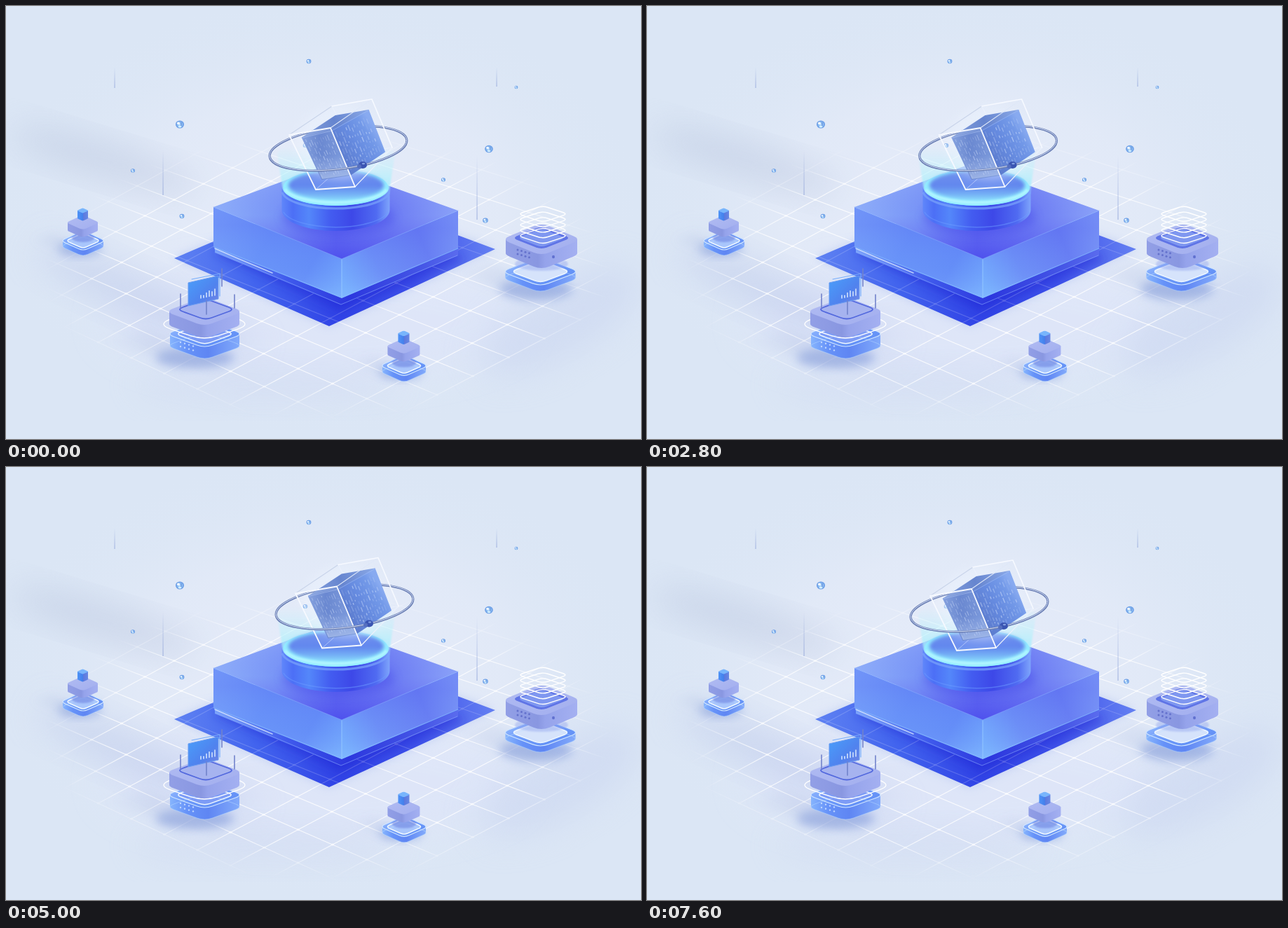
An HTML page for the animation above (7.8 s loop, 906 by 618 pixels).

```html
<!DOCTYPE html>
<html lang="en">
<head>
<meta charset="utf-8">
<title>Isometric platform</title>
<style>
html, body { margin: 0; width: 100%; height: 100%; overflow: hidden; background: #dbe6f5; }
svg { display: block; width: 100vw; height: 100vh; }
</style>
</head>
<body>
<svg id="stage" viewBox="0 0 906 618" xmlns="http://www.w3.org/2000/svg"></svg>
<script>
const stage = document.getElementById('stage');
const STEP = 200, LOOP = 7800;

// --- drawing helpers -------------------------------------------------
const stops = list => list.map(([at, color, alpha = 1]) =>
  `<stop offset="${at}" stop-color="${color}" stop-opacity="${alpha}"/>`).join('');
const linear = (id, x1, y1, x2, y2, list) =>
  `<linearGradient id="${id}" gradientUnits="userSpaceOnUse" x1="${x1}" y1="${y1}" x2="${x2}" y2="${y2}">${stops(list)}</linearGradient>`;
const boxed = (id, x2, y2, list) =>
  `<linearGradient id="${id}" x1="0" y1="0" x2="${x2}" y2="${y2}">${stops(list)}</linearGradient>`;
const radial = (id, list) => `<radialGradient id="${id}">${stops(list)}</radialGradient>`;
const blur = (id, size) =>
  `<filter id="${id}" x="-50%" y="-50%" width="200%" height="200%"><feGaussianBlur stdDeviation="${size}"/></filter>`;
const poly = (points, fill, more = '') => `<polygon points="${points}" fill="${fill}" ${more}/>`;
const line = (points, color, width = 1, more = '') =>
  `<polyline points="${points}" fill="none" stroke="${color}" stroke-width="${width}" stroke-linejoin="round" stroke-linecap="round" ${more}/>`;
const ellipse = (cx, cy, rx, ry, fill, more = '') =>
  `<ellipse cx="${cx}" cy="${cy}" rx="${rx}" ry="${ry}" fill="${fill}" ${more}/>`;
const round = (color, width) => `stroke="${color}" stroke-width="${width}" stroke-linejoin="round"`;

// Rounded rhombus whose visible extents are hw and hh.
function rhomb(cx, cy, hw, hh, fill, more = '', cut = 0.2) {
  const w = hw / (1 - cut / 2), h = hh / (1 - cut / 2);
  const corners = [[cx - w, cy], [cx, cy - h], [cx + w, cy], [cx, cy + h]];
  const toward = (a, b) => [a[0] + (b[0] - a[0]) * cut, a[1] + (b[1] - a[1]) * cut];
  const d = corners.map((c, i) => {
    const before = toward(c, corners[(i + 3) % 4]), after = toward(c, corners[(i + 1) % 4]);
    return `${i ? 'L' : 'M'}${before}Q${c} ${after}`;
  }).join('');
  return `<path d="${d}Z" fill="${fill}" ${more}/>`;
}

function box(cx, cy, hw, hh, h, top, side) {
  return rhomb(cx, cy + h, hw, hh, side) +
    `<rect x="${cx - hw}" y="${cy}" width="${2 * hw}" height="${h}" fill="${side}"/>` +
    rhomb(cx, cy, hw, hh, top);
}

function random(seed) {
  return () => (seed = (seed * 16807) % 2147483647) / 2147483647;
}

// --- scenery -----------------------------------------------------------
const SHEET = '240,360 461,457 698,347 470,262';
const TOP = '296,287 460,226 645,292 479,361';
const LEFT = '296,287 479,361 479,417 296,344';
const RIGHT = '479,361 645,292 645,346 479,417';

const defs = `<defs>
${radial('haze', [[0, '#e6ecfa'], [0.55, '#e3eaf8', 0.8], [1, '#dbe6f5', 0]])}
${radial('fade', [[0, '#fff'], [0.75, '#fff', 0.9], [1, '#fff', 0]])}
${radial('drop', [[0, '#d3ecff'], [0.5, '#93c3f5'], [1, '#5f93e2']])}
${linear('streak', 0, 0, 0, 1, [[0, '#8ea2d8', 0], [1, '#8ea2d8', 0.8]])}
${boxed('cast', 1, 0.45, [[0, '#a9b8de', 0], [1, '#a9b8de', 0.6]])}
${linear('sheet', 240, 361, 698, 347, [[0, '#5f82f2'], [0.25, '#4264ee'], [0.5, '#3144e6'], [0.75, '#3f52ea'], [1, '#6480f2']])}
${linear('top', 300, 285, 645, 295, [[0, '#92b5fa'], [0.25, '#7a99f7'], [0.5, '#5c66f0'], [0.72, '#6b7bf3'], [1, '#8ea8f9']])}
${linear('topShade', 470, 235, 470, 361, [[0, '#a5bcfb', 0.4], [0.5, '#6a72f2', 0.1], [1, '#4644ec', 0.65]])}
${linear('left', 296, 300, 479, 400, [[0, '#82b2fc'], [0.4, '#6c9af9'], [0.75, '#6692f8'], [1, '#74acfd']])}
${linear('right', 479, 390, 645, 318, [[0, '#78b4fe'], [0.3, '#7094f7'], [0.7, '#6c83f3'], [1, '#86a5f8']])}
${boxed('faceShade', 0, 1, [[0.2, '#4f5cf0', 0.35], [0.65, '#5a74f4', 0.15], [1, '#8fc0ff', 0.3]])}
${linear('plate', 298, 350, 645, 350, [[0, '#7aa2fa'], [0.3, '#3f5aec'], [0.55, '#2c37de'], [0.85, '#4556e6'], [1, '#5a6bee']])}
${linear('drum', 394, 0, 547, 0, [[0, '#5f86fa'], [0.1, '#4c6ff6'], [0.25, '#5487fa'], [0.45, '#435cf0'], [0.65, '#3d48e8'], [0.88, '#506bf1'], [1, '#7da3fb']])}
${linear('disc', 0, 236, 0, 282, [[0, '#6f92ee'], [0.45, '#6286ee'], [0.7, '#73aef5'], [1, '#93ecff']])}
${linear('beam', 0, 200, 0, 286, [[0, '#b9f1fb', 0], [0.4, '#b4f1fb', 0.5], [0.75, '#a0effd', 0.9], [1, '#86e9ff']])}
${linear('faceL', 423, 215, 480, 212, [[0, '#7d9bdc'], [0.45, '#5f7fcd'], [1, '#7090d8']])}
${linear('faceR', 478, 215, 530, 180, [[0, '#5d7dcf'], [0.45, '#668be0'], [0.8, '#7399e8'], [1, '#88aaf0']])}
${linear('faceT', 423, 188, 517, 149, [[0, '#87a3de'], [0.5, '#6685cf'], [1, '#8aa8e6']])}
${linear('faceFade', 0, 212, 0, 248, [[0, '#b9cdf2', 0], [1, '#b9cdf2', 0.6]])}
${linear('hoop', 376, 0, 572, 0, [[0, '#6b7fb4'], [0.35, '#9db0dc'], [0.65, '#6478b8'], [1, '#7788bd']])}
${boxed('glass', 1, 1, [[0, '#9cc1ff'], [0.5, '#6d9af9'], [1, '#5c8af4']])}
${boxed('glassSide', 1, 0, [[0, '#86b4fd'], [0.25, '#6692f8'], [0.55, '#5f86f3'], [1, '#82aafb']])}
${boxed('lilacTop', 1, 1, [[0, '#b0bbf2'], [1, '#a3afef']])}
${boxed('lilacSide', 1, 0, [[0, '#929fe6'], [0.45, '#8997e1'], [0.55, '#95a3eb'], [1, '#a4b0f1']])}
${boxed('cell', 1, 0, [[0, '#4f93f6'], [0.5, '#4480ec'], [0.52, '#5a78de'], [1, '#6787e4']])}
${boxed('panel', 1, 1, [[0, '#49a0fb'], [0.6, '#5082ee'], [1, '#7684e2']])}
${blur('soft', 1.2)}${blur('glow', 2.5)}${blur('mist', 7)}${blur('fog', 24)}
<mask id="gridMask">${ellipse(458, 385, 405, 205, 'url(#fade)')}</mask>
<clipPath id="onSheet">${poly(SHEET, '#000')}</clipPath>
</defs>`;

function background() {
  return `<rect width="906" height="618" fill="#dbe6f5"/>` +
    ellipse(450, 300, 470, 320, 'url(#haze)') +
    ellipse(440, 450, 300, 85, '#dde4f9', 'opacity=".6" filter="url(#fog)"') +
    ellipse(140, 220, 140, 24, '#b4c0da', 'opacity=".45" filter="url(#fog)" transform="rotate(17 140 220)"') +
    ellipse(200, 420, 170, 30, '#bcc8ea', 'opacity=".5" filter="url(#fog)" transform="rotate(25 200 420)"') +
    ellipse(790, 450, 130, 50, '#c8d3f0', 'opacity=".5" filter="url(#fog)" transform="rotate(-30 790 450)"') +
    ellipse(370, 540, 190, 26, '#cbd5f0', 'opacity=".4" filter="url(#fog)"');
}

function grid() {
  const front = [465, 492], left = [165, 366], right = [706, 364], back = [378, 250];
  const at = (i, j) => [0, 1].map(k => {
    const u = i / 6, v = j / 5;
    return +((1 - u) * ((1 - v) * front[k] + v * right[k]) + u * ((1 - v) * left[k] + v * back[k])).toFixed(1);
  });
  let out = '';
  for (let i = -3; i <= 9; i++) out += line(`${at(i, -3)} ${at(i, 9)}`, '#fff', 1.1);
  for (let j = -3; j <= 9; j++) out += line(`${at(-3, j)} ${at(9, j)}`, '#fff', 1.1);
  for (let i = -3; i <= 9; i++) for (let j = -3; j <= 9; j++) {
    const [x, y] = at(i, j);
    out += ellipse(x, y, 2, 1.4, '#fff');
  }
  return `<g id="grid" mask="url(#gridMask)" opacity=".9">${out}</g>`;
}

function streaks() {
  return [[155, 87, 30], [224, 205, 65], [700, 87, 28], [672, 213, 92]].map(([x, y, h]) =>
    `<rect width="1.1" height="1" fill="url(#streak)" transform="translate(${x - 0.5} ${y}) scale(1 ${h})"/>`).join('');
}

function drops() {
  return [[432, 79, 3.4], [248, 169, 6], [181, 235, 3], [251, 300, 3.4], [728, 116, 2.4],
    [689, 204, 5.8], [624, 248, 3], [684, 306, 3.8], [427, 199, 3.3]].map(([x, y, r]) =>
    ellipse(x, y, r, r * 0.92, 'url(#drop)') +
    ellipse(x - r * 0.35, y - r * 0.3, r * 0.32, r * 0.28, '#fff', 'opacity=".9"') +
    ellipse(x + r * 0.3, y - r * 0.1, r * 0.2, r * 0.45, '#4274cc', 'opacity=".45"') +
    ellipse(x, y + r * 0.55, r * 0.4, r * 0.2, '#d6f3ff')).join('');
}

function platform() {
  return poly(SHEET, '#8fa5ea', 'opacity=".35" filter="url(#mist)"') +
    poly(SHEET, 'url(#sheet)') +
    '<g clip-path="url(#onSheet)">' +
    poly('296,352 479,436 655,360 470,285', '#1f24d0', 'opacity=".45" filter="url(#mist)"') +
    '<use href="#grid" opacity=".22"/></g>' +
    poly('298,345 478,415 645,347 645,356 478,427 298,352', 'url(#plate)') +
    line('298,346 330,360 380,381', '#dcebff', 1.6, 'opacity=".75"') +
    line('300,351 478,426 644,356', '#8fb0ff', 1, 'opacity=".55"') +
    poly(LEFT, 'url(#left)') + poly(LEFT, 'url(#faceShade)') +
    poly(RIGHT, 'url(#right)') + poly(RIGHT, 'url(#faceShade)') +
    poly(TOP, 'url(#top)') + poly(TOP, 'url(#topShade)') +
    line('296,287 479,361 645,292', '#8db2ff', 1, 'opacity=".6"') +
    line('479,362 479,416', '#9accff', 1.2, 'opacity=".7"') +
    line('297,344 479,416 645,346', '#87bcff', 1.2, 'opacity=".7"');
}

function drum() {
  return ellipse(474, 301, 80, 25, '#3d3ee6', 'opacity=".35" filter="url(#mist)"') +
    `<path d="M387 212L395 262A76 27 0 0 0 547 262L555 212A84 20 0 0 0 387 212Z" fill="url(#beam)" filter="url(#soft)"/>` +
    `<path d="M393.500 257V291A77 30 0 0 0 547.500 291V257A77 28 0 0 1 393.500 257Z" fill="url(#drum)"/>` +
    `<path d="M394 266A77 26 0 0 0 547 266" fill="none" stroke="#7ba4fc" stroke-width="3" opacity=".7"/>` +
    `<path d="M396 294A76 27 0 0 0 545 294" fill="none" stroke="#6d9bff" stroke-width="1.500" opacity=".5"/>` +
    ellipse(470.500, 259, 75, 26, '#93ecff') +
    ellipse(471, 256, 68, 21, 'url(#disc)', 'filter="url(#glow)"') +
    `<path d="M398 262A74 23 0 0 0 543 262" fill="none" stroke="#b8f8ff" stroke-width="4" opacity=".8" filter="url(#soft)"/>`;
}

// --- satellites ----------------------------------------------------------
const shadow = (x, y, rx, ry) =>
  ellipse(x - rx * 0.15, y, rx, ry, '#7f99dc', 'opacity=".6" filter="url(#mist)"') +
  poly(`${x + rx * 0.5},${y + ry * 0.7} ${x - rx * 0.6},${y + ry * 0.7} ${x - rx * 2.4},${y - rx * 0.45} ${x - rx * 1.4},${y - rx * 0.75}`,
    'url(#cast)', 'opacity=".7" filter="url(#mist)"');

function slab(cx, cy, hw, hh, h, hollow) {
  return box(cx, cy, hw, hh, h, 'url(#glass)', 'url(#glassSide)') +
    rhomb(cx, cy, hw, hh, 'none', 'stroke="#cfe5ff" stroke-width="1.200"') +
    rhomb(cx, cy, hw * 0.76, hh * 0.76, hollow, 'stroke="#eef7ff" stroke-width="1.500"') +
    rhomb(cx, cy + h, hw, hh, 'none', 'stroke="#bfe0ff" stroke-width="1" opacity=".45"');
}

function smallNode(cx, cy, scale) {
  return shadow(cx, cy + 46, 31, 9) + `<g transform="translate(${cx} ${cy}) scale(${scale})">` +
    slab(0, 34, 29, 13, 8, '#a9c6fc') +
    ellipse(0, 30, 16, 6, '#6377dc', 'opacity=".5" filter="url(#soft)"') +
    box(-0.5, 8, 21.5, 9.5, 11, 'url(#lilacTop)', 'url(#lilacSide)') +
    box(-0.5, -9, 7.5, 3.5, 11, '#78b5fc', 'url(#cell)') + '</g>';
}

function stackNode() {
  let out = shadow(764, 404, 52, 15) + slab(762.5, 379, 50, 19, 9, '#d6e3fb') +
    ellipse(764, 368, 38, 10, '#8b9eed', 'opacity=".4" filter="url(#soft)"') +
    box(764, 333, 51, 21, 20, 'url(#lilacTop)', 'url(#lilacSide)') +
    rhomb(764, 331, 38, 15, '#5f74e6') + rhomb(764, 331, 31, 12, '#7f97f0');
  for (let k = 0; k < 5; k++)
    out += rhomb(766, 328 - k * 7.8, 32, 10.5, 'none', 'stroke="#fff" stroke-width="1.400"');
  for (let k = 0; k < 8; k++) {
    const col = k % 4, row = k >> 2;
    out += ellipse(730 + col * 5.5, 348 + col * 1.6 + row * 6, 1.5, 1.5, '#6472cd');
  }
  return out + ellipse(781, 358, 2, 2.3, '#6171d0');
}

function chartNode() {
  const rod = (x, y1, y2) => line(`${x},${y1} ${x},${y2}`, '#7182cb', 1.6);
  let out = shadow(278, 502, 56, 14) + slab(283.5, 468, 49.5, 18, 17, '#7d9cf6') +
    rhomb(283, 454, 58, 20, 'none', 'stroke="#fff" stroke-width="1.300"', 0.3) +
    box(283, 436, 50, 19, 18, 'url(#lilacTop)', 'url(#lilacSide)') +
    rhomb(285, 433, 37, 13.5, '#a6b3ef', 'stroke="#5369de" stroke-width="1.800"') +
    rod(249, 411, 431) + rod(308, 375, 400) + rod(326, 412, 431) +
    poly('260,395 303,385 303,418 260,428', 'url(#panel)', round('#6b9cf1', 1)) +
    line('265,390 305,382 305,414', '#77adfc', 1.2) + rod(286, 421, 440);
  [4, 3, 6, 8, 6, 9].forEach((h, k) => {
    const x = 278 + k * 4;
    out += line(`${x},${417 - k * 0.8} ${x},${417 - k * 0.8 - h}`, '#e3efff', 1.4);
  });
  for (let k = 0; k < 8; k++)
    out += ellipse(249 + (k % 4) * 6, 480 + (k % 4) * 1.8 + (k >> 2) * 6, 1.2, 1.2, '#bfd6ff');
  return out;
}

// --- floating cube -------------------------------------------------------
function codeFace(matrix, columns, seed) {
  const next = random(seed);
  let out = '';
  for (let c = 0; c < columns; c++) {
    let y = 0.05 + next() * 0.12;
    while (y < 0.9) {
      const len = 0.02 + next() * 0.12;
      out += `<rect x="${(0.06 + 0.88 * c / columns).toFixed(3)}" y="${y.toFixed(3)}" width=".022" height="${Math.min(len, 0.95 - y).toFixed(3)}" opacity="${(0.1 + next() * 0.45).toFixed(2)}"/>`;
      y += len + 0.02 + next() * 0.13;
    }
  }
  return `<g fill="#dce9ff" transform="matrix(${matrix})">${out}</g>`;
}

function hoopHalf(sweep) {
  const arc = (color, width, dy = 0) =>
    `<path d="M-98.500 ${dy}A98.500 30 0 0 ${sweep} 98.500 ${dy}" fill="none" stroke="${color}" stroke-width="${width}"/>`;
  return `<g transform="translate(474 203) rotate(-7)">` +
    arc('url(#hoop)', 3.2) + arc('#d5e0f7', 0.9, -0.4) + '</g>';
}

function floating() {
  const leftFace = '423,188 465,178 491,241 451,247';
  const cube = poly('423,188 470,157 517,149 465,178', 'url(#faceT)', round('url(#faceT)', 2)) +
    poly(leftFace, 'url(#faceL)', round('url(#faceL)', 2)) +
    poly('465,178 517,149 540,208 491,241', 'url(#faceR)', round('url(#faceR)', 2)) +
    codeFace('42 -10 27 61 423 188', 11, 71) + codeFace('52 -29 25 61 465 178', 13, 433) +
    poly(leftFace, 'url(#faceFade)') +
    line('423,188 465,178 517,149', '#a9c0f0', 0.8, 'opacity=".7"') +
    line('465,178 491,241', '#a9c0f0', 0.8, 'opacity=".6"');
  return ellipse(477, 195, 62, 52, '#eef5ff', 'opacity=".4" filter="url(#mist)"') +
    hoopHalf(1) +
    line('465,143 500,210 551,202', '#eef4ff', 1, 'opacity=".7"') +
    line('500,210 442,262', '#eef4ff', 0.8, 'opacity=".6"') +
    cube +
    poly('404,184 463,174 498,258 442,262', '#fff', 'opacity=".07"') +
    line('404,184 465,143', '#c9d4ea', 1.1) +
    line('463,174 522,133', '#dfe8f8', 1.1) +
    line('498,258 551,202', '#eaf1fc', 1.3) +
    line('465,143 522,133 551,202', '#f6f9ff', 1.7) +
    line('404,184 463,174 498,258 442,262 404,184', '#f6f9ff', 1.8) +
    hoopHalf(0) +
    ellipse(509, 227, 6, 5, '#3a55b2') + ellipse(504, 229, 3, 3, '#5570c0') +
    ellipse(510, 225, 2.2, 1.3, '#7f9de0');
}

stage.innerHTML = defs + background() + grid() + streaks() + platform() + drum() +
  smallNode(110, 301, 1) + stackNode() + chartNode() + smallNode(568, 477, 1.07) +
  drops() + `<g id="floating">${floating()}</g>`;

// --- motion: right, up, left, down ------------------------------------------
const floater = document.getElementById('floating');
const path = [[0, 0, 0], [1200, 5, 0], [1800, 8, -0.2], [2800, 12.6, 0], [3800, 14.7, -3],
  [5000, 9, -3.5], [6000, 4.2, -3.3], [7200, 0.3, -2.6], [7600, 0, 0], [7800, 0, 0]];

function offsetAt(time) {
  const k = path.findIndex(([t]) => t > time);
  const [t0, x0, y0] = path[k - 1], [t1, x1, y1] = path[k];
  const p = (time - t0) / (t1 - t0);
  return [x0 + (x1 - x0) * p, y0 + (y1 - y0) * p];
}

const start = performance.now();
function draw(now) {
  const time = Math.floor((Math.max(0, now - start) % LOOP) / STEP) * STEP;
  const [x, y] = offsetAt(time);
  floater.setAttribute('transform', `translate(${x.toFixed(2)} ${y.toFixed(2)})`);
  requestAnimationFrame(draw);
}
draw(start);
</script>
</body>
</html>
```
